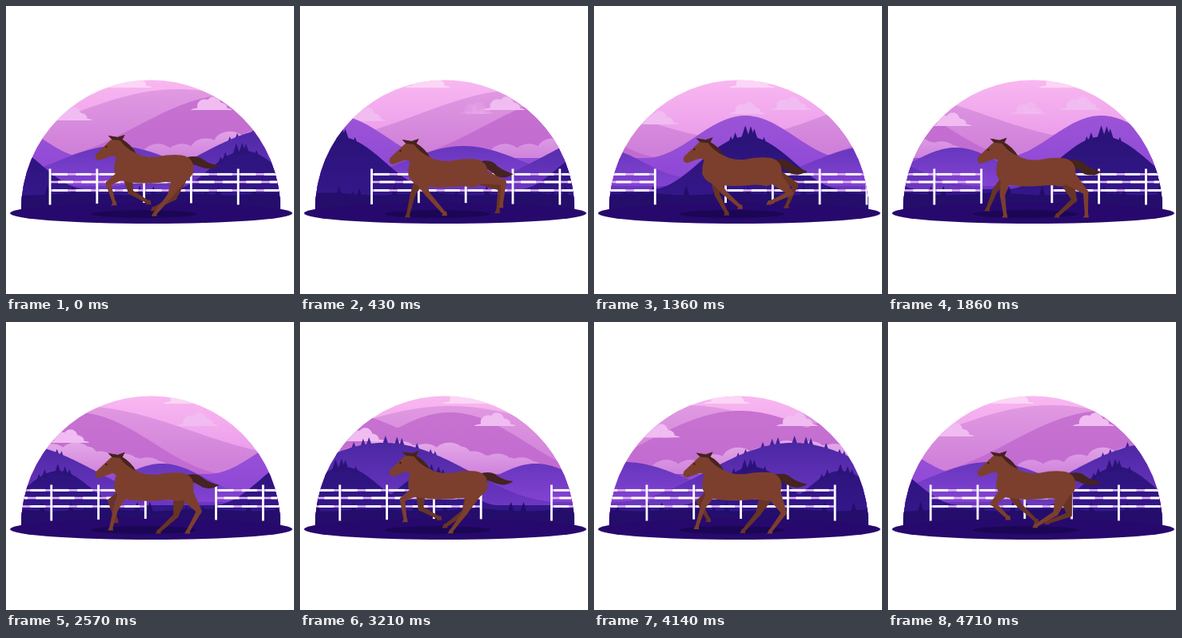
Recreate the animation shown at these times as an HTML page with a canvas. Size 360 by 360 pixels, loop 4780 ms.

```html
<!DOCTYPE html>
<html>
<head>
<meta charset="utf-8">
<style>
html, body { margin: 0; width: 100%; height: 100%; overflow: hidden; background: #fff; }
canvas { display: block; width: 360px; height: 360px; }
</style>
</head>
<body>
<canvas id="stage"></canvas>
<script>
const LOOP = 4780, STEP = LOOP / 67, STRIDE = LOOP / 6, TURN = Math.PI * 2;
const LAND = 741, LAND_SPEED = 0.155;
const FENCE = 382.2, FENCE_SPEED = 0.0808, POST_GAP = 58.8;
const canvas = document.getElementById('stage');
const c = canvas.getContext('2d');
const scale = window.devicePixelRatio || 1;
canvas.width = canvas.height = 360 * scale;

const mod = (a, n) => ((a % n) + n) % n;
const wrap = u => mod(u + LAND / 2, LAND) - LAND / 2;
const bell = d => Math.abs(d) < 1 ? (1 + Math.cos(Math.PI * d)) / 2 : 0;

function fade(top, bottom, y0, y1) {
  const g = c.createLinearGradient(0, y0, 0, y1);
  g.addColorStop(0, top);
  g.addColorStop(1, bottom);
  return g;
}

function ellipse(x, y, rx, ry, color) {
  c.fillStyle = color;
  c.beginPath();
  c.ellipse(x, y, rx, ry, 0, 0, TURN);
  c.fill();
}

function shape(path, color) {
  c.fillStyle = color;
  c.fill(new Path2D(path));
}

// Each hump is [centre, top, half width]; the ridge follows the highest one.
const hills = (base, ...humps) => u => Math.min(...humps.map(
  ([x, top, w]) => base - (base - top) * bell(wrap(u - x) / w)));

const farHill = hills(168, [215, 104, 270], [-310, 105, 290]);
const pinkHill = hills(191, [282, 111, 240], [-310, 113, 195]);
const orchidHill = hills(190, [-21, 137, 125]);
const violetHill = hills(214, [138, 175, 150], [-203, 177, 110]);
const indigoHill = hills(225, [348, 151, 220]);
const darkHill = hills(229, [-19, 163, 120], [298, 181, 90], [-333, 186, 82]);
const meadow = u => 235 + 1.5 * Math.sin(u * TURN * 6 / LAND);

function ridge(height, shift, color) {
  c.fillStyle = color;
  c.beginPath();
  c.moveTo(0, 262);
  for (let x = 0; x <= 360; x += 3) c.lineTo(x, height(x - shift));
  c.lineTo(360, 262);
  c.fill();
}

function tree(u, base, h, shift, color) {
  const x = wrap(u + shift - 180) + 180, half = h * 0.26 + 1;
  c.fillStyle = color;
  c.beginPath();
  c.moveTo(x, base - h);
  c.lineTo(x + half, base);
  c.lineTo(x - half, base);
  c.fill();
}

function grove(height, centre, spread, count, tall, shift, color) {
  for (let i = 0; i < count; i++) {
    const d = (i + 0.5 + 0.35 * Math.sin(i * 4.3)) / count * 2 - 1;
    const u = centre + d * spread;
    tree(u, height(u) + 4, 8 + tall * bell(d), shift, color);
  }
}

function cloud(x, y, w, color) {
  c.save();
  c.beginPath();
  c.rect(x - w, y - w, 2 * w, w + 5);
  c.clip();
  ellipse(x - w * 0.2, y, w * 0.23, w * 0.2, color);
  ellipse(x + w * 0.06, y, w * 0.23, w * 0.28, color);
  ellipse(x + w * 0.26, y + 2, w * 0.2, w * 0.15, color);
  ellipse(x, y + 5, w * 0.62, 3.5, color);
  c.restore();
}

function cloudBank(shift) {
  const color = fade('#e8ade9', '#cf83dc', 145, 190);
  for (let i = -7; i <= 5; i++) {
    const x = wrap(370 + i * 30 + shift - 180) + 180;
    const y = 178 - 29 * bell(i / 7.5) + 3 * Math.sin(i * 2.4);
    ellipse(x, y + 17, 21, 17, color);
    ellipse(x + 15, y + 19, 13, 14, color);
  }
}

function clouds(t) {
  const drift = Math.cos(t / LOOP * TURN), color = '#f0bcf1';
  cloud(190 - 36 * drift, 97, 46, '#fbd6f6');
  cloud(80 + 2 * drift, 142 - 4 * drift, 42, color);
  cloud(248 + 9 * drift, 125, 42, color);
  c.globalAlpha = bell((t - 1360) / 1300);
  cloud(235 - 0.032 * t, 130, 36, color);
  c.globalAlpha = 1;
}

function fence(t) {
  for (let k = -1; k <= 0; k++) {
    const x = 55 + FENCE_SPEED * t + k * FENCE;
    [210.3, 220, 230.5].forEach((y, row) => {
      c.fillStyle = '#dfb4f1';
      c.fillRect(x, y - 1.3, POST_GAP * 5, 2.6);
      c.fillStyle = '#fff';
      for (let i = 0; i < 10; i++)
        c.fillRect(x + i * POST_GAP / 2 + 3 + (row % 2) * 7, y - 1.4, 19, 2.8);
    });
    c.fillStyle = '#fff';
    for (let i = 0; i < 6; i++) c.fillRect(x + i * POST_GAP - 1.4, 203.5, 2.8, 45);
  }
}

// Every hoof runs round an ellipse, flattened where it meets the ground.
const legs = {
  frontNear: { x: 156, reach: 30, ahead: 0.13, y: 255, lift: 9, down: 0.4 },
  frontFar: { x: 154, reach: 32, ahead: 0.39, y: 254.5, lift: 8.5, down: 0.57 },
  hindNear: { x: 220.5, reach: 37, ahead: 0.945, y: 257, lift: 10, down: 0.18 },
  hindFar: { x: 214, reach: 35, ahead: 0.09, y: 257, lift: 7, down: 0.3 }
};

function hoofAt({ x, reach, ahead, y, lift, down }, p) {
  return [x - reach * Math.cos(TURN * (p - ahead)),
    Math.min(263, y + lift * Math.cos(TURN * (p - down)))];
}

function taper(x0, y0, r0, x1, y1, r1, color) {
  const a = Math.atan2(y1 - y0, x1 - x0) + Math.PI / 2;
  const dx = Math.cos(a), dy = Math.sin(a);
  c.fillStyle = color;
  c.beginPath();
  c.moveTo(x0 + dx * r0, y0 + dy * r0);
  c.lineTo(x1 + dx * r1, y1 + dy * r1);
  c.lineTo(x1 - dx * r1, y1 - dy * r1);
  c.lineTo(x0 - dx * r0, y0 - dy * r0);
  c.fill();
  ellipse(x0, y0, r0, r0, color);
  ellipse(x1, y1, r1, r1, color);
}

// Two bones from hip to hoof; bend picks the side the joint points to.
function leg(x, y, [hx, hy], upper, lower, bend, thick, color) {
  const dx = hx - x, dy = hy - y;
  const dist = Math.min(Math.hypot(dx, dy), upper + lower - 0.3);
  const cos = (upper * upper + dist * dist - lower * lower) / (2 * upper * dist);
  const a = Math.atan2(dy, dx) + bend * Math.acos(Math.max(-1, Math.min(1, cos)));
  const kx = x + upper * Math.cos(a), ky = y + upper * Math.sin(a);
  taper(x, y, thick, kx, ky, 3.2, color);
  taper(kx, ky, 3.2, hx, hy - 1, 2, color);
  shape(`M${hx + 2} ${hy - 4} l1 5.5 h-7 l3 -5.5Z`, color);
}

function horse(t) {
  const p = mod(t / STRIDE, 1), wave = Math.cos(p * TURN);
  const bob = 4.5 - 2.6 * wave, sway = 3 - 3 * wave;
  const brown = '#7c3f2e', shade = '#683426', hair = '#45231f';
  const front = (path, x, color) => leg(x, 207 + bob, hoofAt(path, p), 24, 27, 1, 7, color);
  const hind = (path, x, color) => leg(x, 204 + bob, hoofAt(path, p), 35, 30, -1, 11, color);
  front(legs.frontFar, 151, shade);
  hind(legs.hindFar, 220, shade);
  c.save();
  c.translate(1.5, bob);
  shape(`M225 187 Q238 184 245 ${190 + sway / 2} Q253 ${196 + sway / 2} 265 ${197 + sway}
    Q256 ${204 + sway} 244 ${200 + sway} Q235 196 227 195Z`, hair);
  c.restore();
  hind(legs.hindNear, 221, brown);
  front(legs.frontNear, 148, brown);
  c.save();
  c.translate(1.5, bob);
  shape(`M129 166 L111 183 Q108 190 115 191 L126 187 Q132 184 136 187 Q133 198 134 205
    Q137 213 146 217 Q165 221 190 219 Q204 217 214 220 Q233 214 233 202 Q233 187 218 184.5
    Q204 183 188 186.5 Q170 188 160 181 Q151 168 144 165 L147 159 L138 162 L127 160 L131 165Z`, brown);
  shape('M126 160 L138 162 L147 159 L144 165 Q155 171 161 182 Q148 176 141 166 L131 165Z', hair);
  ellipse(124, 174, 1.2, 1, '#2c1412');
  c.restore();
}

function draw(t) {
  const shift = LAND_SPEED * t;
  c.setTransform(scale, 0, 0, scale, 0, 0);
  c.fillStyle = '#fff';
  c.fillRect(0, 0, 360, 360);
  c.save();
  c.beginPath();
  c.arc(181, 254.5, 162, Math.PI, 0);
  c.clip();
  c.fillStyle = fade('#f9b8f1', '#e897e8', 92, 180);
  c.fillRect(0, 0, 360, 262);
  ridge(farHill, shift, fade('#e29be2', '#cf80d9', 100, 180));
  ridge(pinkHill, shift, fade('#c872d0', '#c06ad2', 110, 200));
  cloudBank(shift);
  clouds(t);
  ridge(orchidHill, shift, fade('#9c54d6', '#8a45d6', 135, 235));
  ridge(violetHill, shift, fade('#6636bd', '#8d46d8', 175, 240));
  grove(indigoHill, 348, 75, 11, 5, shift, '#43229a');
  ridge(indigoHill, shift, fade('#4b27a3', '#6f38c4', 150, 235));
  const dark = '#2b1379';
  ridge(darkHill, shift, fade(dark, '#34178a', 165, 240));
  grove(darkHill, -19, 24, 6, 10, shift, dark);
  grove(darkHill, 290, 26, 6, 7, shift, dark);
  grove(darkHill, -336, 26, 5, 5, shift, dark);
  for (let i = 0; i < 46; i++)
    tree(i * LAND / 46 + 9 * Math.sin(i * 5.1), 246, 15 + 7 * Math.sin(i * 2.7), shift, '#230d69');
  ridge(meadow, shift, '#240d6b');
  fence(t);
  c.restore();
  ellipse(181.5, 259, 176.5, 13, '#27096d');
  ellipse(172, 260, 66, 5, '#1b0655');
  horse(t);
}

function tick(now) {
  draw(Math.floor((now % LOOP + 2) / STEP) % 67 * STEP);
  requestAnimationFrame(tick);
}
requestAnimationFrame(tick);
</script>
</body>
</html>
```
